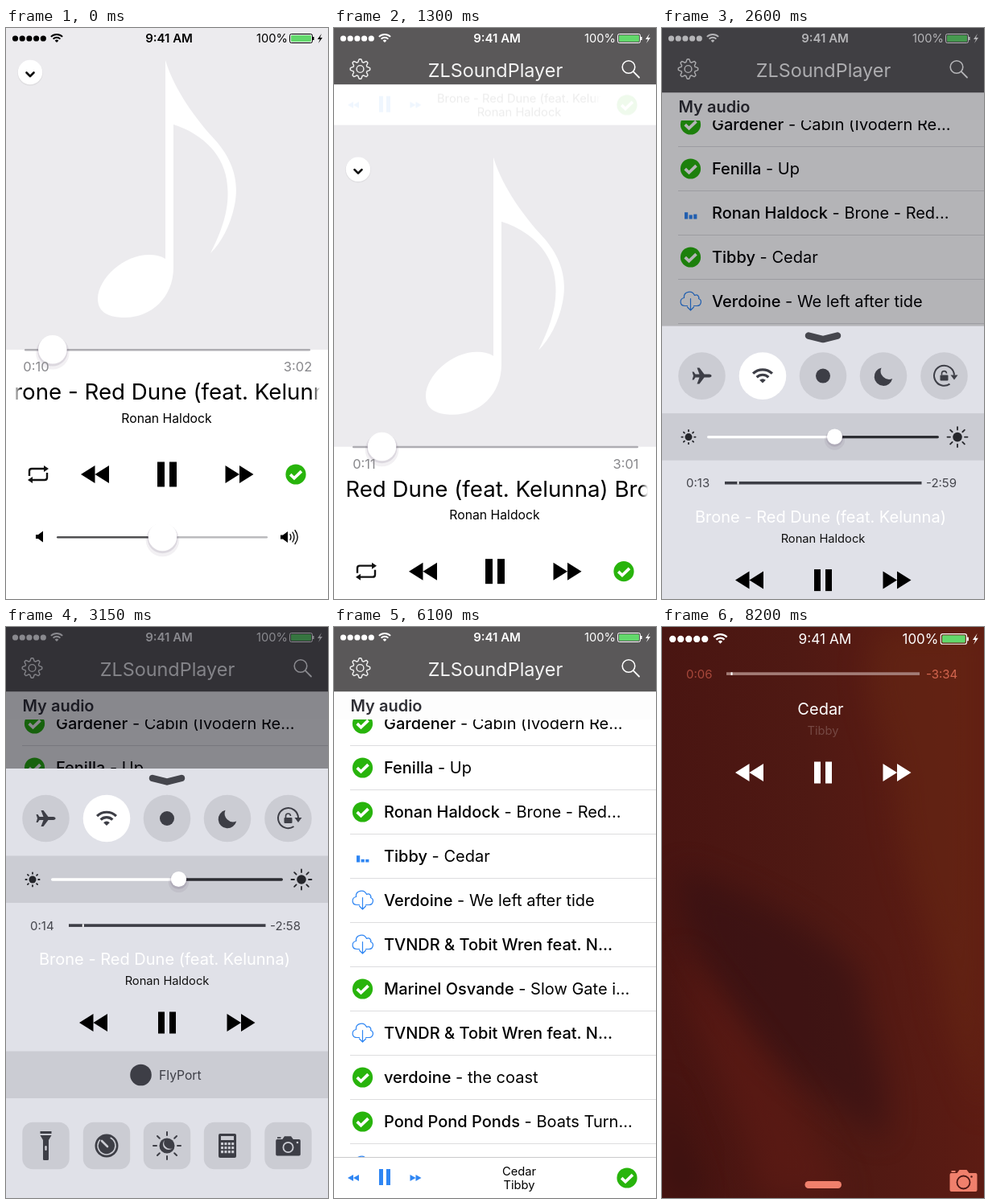
Animation, 400 px wide and 710 px high, one loop 9.2 s. Source, as an HTML page:

```html
<!DOCTYPE html>
<html lang="en">
<head>
<meta charset="utf-8">
<title>Music player</title>
<style>
html, body { margin: 0; width: 100%; height: 100%; overflow: hidden; background: #fff; }
svg { display: block; width: 100vw; height: 100vh; }
text { font-family: Inter, Roboto, sans-serif; white-space: pre; }
</style>
</head>
<body>
<svg id="stage" viewBox="0 0 400 710"></svg>
<script>
const LOOP = 9200, LAST = 8200, SWITCH = 3500;
const BLUE = '#2f86f3', INK = '#3d3e46', SALMON = '#f0806c', CELL = '#cbccd3';
const SONGS = [
  { title: 'Brone - Red Dune (feat. Kelunna)', artist: 'Ronan Haldock', length: 192 },
  { title: 'Cedar', artist: 'Tibby', length: 220 },
];
const ROWS = [
  ['Gardener', 'Cabin (Ivodern Re...', 1],
  ['Fenilla', 'Up', 1],
  ['Ronan Haldock', 'Brone - Red...', 1],
  ['Tibby', 'Cedar', 1],
  ['Verdoine', 'We left after tide', 0],
  ['TVNDR & Tobit Wren feat. N...', '', 0],
  ['Marinel Osvande', 'Slow Gate i...', 1],
  ['TVNDR & Tobit Wren feat. N...', '', 0],
  ['verdoine', 'the coast', 1],
  ['Pond Pond Ponds', 'Boats Turn...', 1],
  ['', '', 0],
];

// drawing helpers
const esc = s => s.replace(/&/g, '&amp;');
const at = (x, y, body, attrs = '') => `<g transform="translate(${x} ${y})" ${attrs}>${body}</g>`;
const text = (x, y, size, str, attrs = '') => `<text x="${x}" y="${y}" font-size="${size}" ${attrs}>${esc(str)}</text>`;
const mid = (x, y, size, str, attrs = '') => text(x, y, size, str, 'text-anchor="middle" ' + attrs);
const rect = (x, y, w, h, fill, attrs = '') => `<rect x="${x}" y="${y}" width="${w}" height="${h}" fill="${fill}" ${attrs}/>`;
const circle = (x, y, r, fill, attrs = '') => `<circle cx="${x}" cy="${y}" r="${r}" fill="${fill}" ${attrs}/>`;
const fillPath = (d, fill, attrs = '') => `<path d="${d}" fill="${fill}" ${attrs}/>`;
const line = (d, stroke, width, attrs = '') => `<path d="${d}" fill="none" stroke="${stroke}" stroke-width="${width}" ${attrs}/>`;
const ROUND = 'stroke-linecap="round" stroke-linejoin="round"';

function rays(n, inner, outer) {
  let d = '';
  for (let i = 0; i < n; i++) {
    const a = i * 2 * Math.PI / n, c = Math.cos(a), s = Math.sin(a);
    d += `M${(c * inner).toFixed(2)} ${(s * inner).toFixed(2)}L${(c * outer).toFixed(2)} ${(s * outer).toFixed(2)}`;
  }
  return d;
}
const sun = (x, y, r, inner, outer, w) => at(x, y, circle(0, 0, r, '#25262b') + line(rays(8, inner, outer), '#25262b', w, ROUND));

const skip = (x, y, w, h, dir, fill) =>
  at(x, y, fillPath([0, 1].map(k => `M${dir * w * k / 2} 0L${dir * w * (k - 1) / 2} ${-h / 2}V${h / 2}Z`).join(''), fill));
const pause = (x, y, w, h, bar, fill) =>
  rect(x - w / 2, y - h / 2, bar, h, fill) + rect(x + w / 2 - bar, y - h / 2, bar, h, fill);
const check = (x, y) => at(x, y, circle(0, 0, 12.6, '#28b40c') + line('M-6.8 .2L-2 4.8L7-3.8', '#fff', 3.7));
const cloud = (x, y) => at(x, y,
  line('M-4 6H-7C-14 6-14-3-8-4C-9-12 2-14 5-7C9-9 11-5 10-3C15-1 13 6 8 6H4M0-3V11M-4 7.5L0 11.5L4 7.5', BLUE, 1.2, ROUND));
function wifi(x, y, scale, fill) {
  const arc = r => `M${-r * .7} ${9 - r * .7}A${r} ${r} 0 0 1 ${r * .7} ${9 - r * .7}`;
  return at(x, y, `<g transform="scale(${scale})">` + line(arc(17) + arc(10.5), fill, 3.2) + fillPath(arc(5.5) + 'L0 9Z', fill) + '</g>');
}
const knob = (r, id = '') => `<g ${id && `id="${id}"`}>` + circle(0, 4, r + 3, '#203', 'opacity=".06"') +
  circle(0, 2, r + 1, '#203', 'opacity=".1"') + circle(0, 0, r, '#fff') + '</g>';
const camera = fill => fillPath('M-5-13H4L7-9H15Q17-9 17-7V12Q17 14 15 14H-15Q-17 14-17 12V-7Q-17-9-15-9H-8ZM-15-12H-10V-10H-15Z', fill);

function status(fill, scale = 1, weight = 600) {
  let dots = '';
  for (let i = 0; i < 5; i++) dots += circle(11.5 + i * 8.7, 13, 3.6, fill);
  const zoom = (x, body) => `<g transform="translate(${x} 0) scale(${scale})">${body}</g>`;
  return zoom(0, dots + wifi(63, 12.6, .6, fill)) +
    zoom(202.5, mid(0, 18, 15, '9:41 AM', `fill="${fill}" font-weight="${weight}"`)) +
    zoom(394, text(-83, 18, 14.7, '100%', `fill="${fill}"`) +
      rect(-41.5, 7.5, 28, 11, 'none', `rx="2" stroke="${fill}"`) + rect(-40, 9, 25, 8, '#62d86b', 'rx="1"') +
      rect(-13, 11, 1.6, 4, fill) + fillPath('M-2 7L-7 14H-4L-6 19L-1 12H-4Z', fill));
}

// screens
function listScreen() {
  const rows = ROWS.map(([name, song, saved], i) => {
    const y = 119.5 + i * 55;
    return `<g id="icon${i}">` + (saved ? check(35.5, y + .5) : cloud(35.5, y)) + '</g>' +
      `<text x="62" y="${y + 7}" font-size="20"><tspan font-weight="500">${esc(name)}</tspan>${song && ' - ' + song}</text>` +
      rect(20, y + 27.5, 380, 1, '#dddddf');
  }).join('');
  const bars = [0, 1, 2].map(i => `<rect id="bar${i}" x="${28 + i * 5.6}" width="4.2" fill="${BLUE}"/>`).join('');
  const gear = line(Array.from({ length: 65 }, (_, i) => {
    const a = i * Math.PI / 32, r = 10.6 + 1.7 * Math.tanh(3 * Math.cos(8 * a));
    return (i ? 'L' : 'M') + (r * Math.cos(a)).toFixed(2) + ' ' + (r * Math.sin(a)).toFixed(2);
  }).join('') + 'Z', '#f2f2f2', 1.4, ROUND) + circle(0, 0, 4.4, 'none', 'stroke="#f2f2f2" stroke-width="1.4"');
  return rect(0, 0, 400, 710, '#fff') + rows + `<g id="bars">${bars}</g>` +
    rect(0, 80, 400, 35, '#fdfdfd') + text(20.5, 105, 20, 'My audio', 'font-weight="600" fill="#303036"') +
    rect(0, 0, 400, 80, '#5a5859') + rect(0, 80, 400, .6, '#b2b2b2') +
    mid(200.5, 61, 23.4, 'ZLSoundPlayer', 'fill="#f4f4f4"') + at(32.5, 51, gear) +
    at(366, 48.5, circle(0, 0, 7.8, 'none', 'stroke="#fff" stroke-width="1.6"') + line('M5.7 5.7L13 13', '#fff', 1.8, ROUND));
}

function playerScreen() {
  const note = 'M198 40C207 71 230 106 255 134C282 162 290 190 284 220C279 245 268 266 254 280C268 252 278 225 275 196' +
    'C272 155 240 130 208 120V298C208 335 180 360 148 360C122 360 114 350 114 336C115 312 145 282 178 282Q190 282 198 287Z';
  const speaker = 'M-5-2.5H-2L4-7V7L-2 2.5H-5Z';
  const mini = rect(0, -50.5, 400, 51, '#fff') + '<g id="mini">' + rect(0, -51, 400, 1, '#c9c9cb') +
    skip(24, -25, 14, 8, -1, BLUE) + pause(63, -26, 14, 20, 5, BLUE) + skip(101.5, -25, 14, 8, 1, BLUE) +
    '<g clip-path="url(#miniClip)"><text id="miniTitle" y="-28" font-size="14.7"/></g>' +
    rect(320, -48, 12, 26, 'url(#fadeR)') +
    '<text id="miniArtist" x="230" y="-11" font-size="14.7" text-anchor="middle"/>' + check(364, -25) + '</g>';
  const song = SONGS[0].title;
  return mini + rect(0, 0, 400, 710, '#fff') + rect(0, 0, 400, 400, '#ecebee') + fillPath(note, '#fff') +
    circle(30, 56, 15.8, '#000', 'opacity=".05"') + circle(30, 55, 15.2, '#fff') + line('M25.5 55.5L30 60L34.5 55.5', '#111', 2.7, ROUND) +
    rect(23, 399, 355, 2.6, '#aeadb2', 'rx="1.3"') + knob(17.8, 'seek') +
    '<text id="elapsed" x="37.5" y="427" font-size="16.5" text-anchor="middle" fill="#88888c"/>' +
    '<text id="remaining" x="362.5" y="427" font-size="16.5" text-anchor="middle" fill="#88888c"/>' +
    '<g clip-path="url(#marqueeClip)">' + text(0, 462, 27.7, song + ' ' + song, 'id="marquee"') + '</g>' +
    rect(10, 432, 9, 42, 'url(#fadeL)') + rect(381, 432, 9, 42, 'url(#fadeR)') +
    mid(199.5, 490.5, 15.75, SONGS[0].artist) +
    at(40, 555, line('M-11 2V-4Q-11-7-8-7H9M11-2V4Q11 7 8 7H-9', '#111', 2.4) +
      fillPath('M7-11L13-7L7-3ZM-7 11L-13 7L-7 3Z', '#111')) +
    skip(110.5, 555, 35, 22, -1, '#000') + pause(200, 555, 24, 31, 9, '#000') + skip(290, 555, 35, 22, 1, '#000') + check(360, 555) +
    at(42, 632.5, fillPath(speaker, '#000')) +
    rect(63, 632, 132, 2.4, '#505052', 'rx="1.2"') + rect(194, 632, 131, 2.4, '#bbbbbe', 'rx="1.2"') + at(194.5, 632.5, knob(17.8)) +
    at(346, 633, fillPath(speaker, '#000') + line('M7-3.5Q9 0 7 3.5M10-6Q14 0 10 6M13-8.5Q19.5 0 13 8.5', '#000', 1.3, ROUND));
}

// playback block shared by the control panel and the lock screen, origin at the progress line
const playback = (key, x, width, gap, colors) =>
  `<text id="${key}Elapsed" x="30" y="5.5" font-size="15" fill="${colors.left}"/>` +
  `<text id="${key}Remaining" x="328" y="5.5" font-size="15" fill="${colors.right}"/>` +
  rect(x, -1.7, width, 3.6, colors.track) + `<rect id="${key}Tick" y="-1.7" width="2" height="3.6" fill="#fff"/>` +
  `<text id="${key}Title" x="197" y="${gap - 72}" font-size="20" text-anchor="middle" fill="#fff"/>` +
  `<text id="${key}Artist" x="200" y="${gap - 47}" font-size="14.7" text-anchor="middle" fill="${colors.artist}"/>` +
  skip(108.5, gap, 35, 22, -1, colors.button) + pause(200, gap, 22, 27, 8, colors.button) + skip(292, gap, 35, 22, 1, colors.button);

function panelScreen() {
  const xs = [49.5, 125, 200, 275, 350.5];
  const top = [
    fillPath('M12 0C12-2 9-2 7-2H3L-3-10H-6L-3-2H-8L-10-5H-12L-10.5 0L-12 5H-10L-8 2H-3L-6 10H-3L3 2H7C9 2 12 2 12 0Z', INK),
    wifi(0, 0, 1, INK),
    circle(0, 0, 9, INK),
    fillPath('M-2.5-10.2A11.4 11.4 0 1 0 11.2 3.5A10.5 10.5 0 0 1-2.5-10.2Z', INK),
    line('M7 10A12.5 12.5 0 1 1 12.5-1', INK, 2) + fillPath('M8-1H17L12.5 5Z', INK) +
      rect(-5, -1, 10, 7, INK, 'rx="1"') + line('M-3-1V-3Q-3-6 0-6Q3-6 3-3', INK, 1.6),
  ];
  let keys = '';
  for (let i = 0; i < 12; i++) keys += rect(-8 + i % 4 * 4.4, -4 + (i >> 2) * 5, 3, 3.2, CELL);
  const bottom = [
    fillPath('M-7-18H7V-15H-7ZM-7-13H7L3.5-7V17Q3.5 18 2 18H-2Q-3.5 18-3.5 17V-7Z', INK) + rect(-1.2, 0, 2.4, 6, CELL, 'rx="1.2"'),
    circle(0, 0, 14.5, INK) + circle(0, 0, 11, 'none', `stroke="${CELL}" stroke-width="1.6" stroke-dasharray="55 14" transform="rotate(-65)"`) +
      line('M-6-6L1 1', CELL, 2.6, ROUND),
    circle(0, 0, 9.5, INK) + fillPath('M-3-7A7.5 7.5 0 0 0 7 3A6 6 0 0 1-3-7Z', CELL) + line(rays(8, 13, 17), INK, 2, ROUND),
    rect(-11, -15, 22, 30, INK, 'rx="2"') + rect(-8, -12, 16, 5, CELL) + keys,
    `<g transform="scale(.9)">${camera(INK)}</g>` + circle(0, 2, 7, CELL) + circle(0, 2, 5.2, INK) + circle(11.5, -4, 1.3, CELL),
  ];
  return rect(0, 0, 400, 540, '#e0e1e8') + line('M182 12L200 16.5L218 12', '#45464d', 8.5, ROUND) +
    xs.map((x, i) => at(x, 62, circle(0, 0, 29.3, i === 1 ? '#fff' : CELL) + top[i])).join('') +
    rect(0, 108.5, 400, 58.5, CELL) + sun(33, 138, 4.5, 7.2, 8.6, 1.8) + sun(367, 138, 5.8, 9, 12.5, 1.8) +
    rect(56, 136.3, 158, 3.4, '#fff', 'rx="1.7"') + rect(214, 136.3, 130, 3.4, '#2c2d32', 'rx="1.7"') + at(214.5, 137.5, knob(9.6)) +
    at(0, 195, playback('panel', 78, 244.5, 121, { left: '#45464d', right: '#45464d', track: INK, artist: '#111', button: '#000' })) +
    rect(0, 351.5, 400, 58.5, CELL) + circle(167.5, 381, 13.3, INK) + text(190, 387, 15.7, 'FlyPort', `fill="${INK}"`) +
    xs.map((x, i) => at(x, 469, rect(-29.2, -29.2, 58.4, 58.4, CELL, 'rx="13"') + bottom[i])).join('');
}

function lockScreen() {
  return rect(0, 0, 400, 710, 'url(#wall)') +
    fillPath('M400 0H270C230 90 290 130 290 220C300 330 345 380 350 480L400 610Z', '#672913', 'opacity=".5" filter="url(#soft)"') +
    fillPath('M20 300C110 330 190 370 245 430C250 500 290 560 275 640C220 590 150 560 110 500C70 440 20 390 20 300Z', '#321014', 'opacity=".55" filter="url(#soft)"') +
    fillPath('M20 400C80 470 180 590 230 710H120C110 620 40 520 20 400Z', '#641c15', 'opacity=".5" filter="url(#soft)"') +
    fillPath('M0 560L60 710H0Z', '#32100f', 'opacity=".5" filter="url(#soft)"') +
    status('#fff', 1.15, 400) +
    at(0, 58, playback('lock', 80, 240, 123, { left: '#a8483b', right: '#d4664f', track: '#a37d77', artist: '#754843', button: '#fff' })) +
    rect(177.5, 689, 45.5, 9, SALMON, 'rx="4.5"') +
    at(374.5, 688, camera(SALMON) + circle(0, 2.5, 8, 'none', 'stroke="#4a1613" stroke-width="1.8"') + circle(10, -4.5, 1.2, '#4a1613'));
}

const fade = (id, a, b) => `<linearGradient id="${id}"><stop stop-color="#fff" stop-opacity="${a}"/><stop offset="1" stop-color="#fff" stop-opacity="${b}"/></linearGradient>`;
document.getElementById('stage').innerHTML = '<defs>' + fade('fadeL', 1, 0) + fade('fadeR', 0, 1) +
  `<linearGradient id="wall" x1="0" y1=".6" x2="1" y2=".4"><stop stop-color="#481411"/><stop offset=".5" stop-color="#4f1913"/><stop offset="1" stop-color="#601c13"/></linearGradient>
  <filter id="soft" x="-30%" y="-30%" width="160%" height="160%" color-interpolation-filters="sRGB"><feGaussianBlur stdDeviation="18"/></filter>
  <clipPath id="miniClip"><rect x="127" y="-50" width="205" height="50"/></clipPath>
  <clipPath id="marqueeClip"><rect x="10" y="425" width="380" height="55"/></clipPath></defs>` +
  `<g>${listScreen()}</g><g id="player">${playerScreen()}</g>` +
  `<g id="darkStatus">${status('#000')}</g><g id="lightStatus">${status('#fff')}</g>` +
  `<rect id="dim" width="400" height="710" fill="#06060f"/><g id="panel">${panelScreen()}</g>` +
  `<rect id="black" width="400" height="710"/><g id="lock">${lockScreen()}</g>`;

const el = {};
document.querySelectorAll('#stage [id]').forEach(node => el[node.id] = node);
const set = (id, name, value) => el[id].setAttribute(name, value);
const say = (id, str) => { if (el[id].textContent !== str) el[id].textContent = str; };
const show = (id, on) => set(id, 'visibility', on ? 'visible' : 'hidden');
const move = (id, x, y) => set(id, 'transform', `translate(${x} ${y})`);
const ramp = (t, from, to) => Math.min(1, Math.max(0, (t - from) / (to - from)));
const smooth = p => p * p * (3 - 2 * p);
const easeOut = p => 1 - (1 - p) ** 3;
const clock = s => Math.floor(s / 60) + ':' + String(s % 60).padStart(2, '0');

function render(time) {
  const t = Math.min(time, LAST), second = t >= SWITCH;
  const song = SONGS[+second];
  const played = second ? (t - SWITCH) * .0013 : 10.1 + t * .0013;
  const elapsed = Math.floor(played), left = clock(song.length - elapsed), part = elapsed / song.length;

  const drop = smooth(ramp(t, 1087, 1900));
  move('player', 0, 710 * drop);
  set('mini', 'opacity', Math.max(0, (drop - .1) / .9));
  show('darkStatus', drop < .01);
  show('lightStatus', drop >= .01);
  move('seek', 41.2 + 320 * part, 399.8);
  set('marquee', 'x', -8 - .064 * t);
  say('elapsed', clock(elapsed));
  say('remaining', left);
  say('miniTitle', song.title);
  say('miniArtist', song.artist);
  set('miniTitle', 'x', second ? 230 : 128);
  set('miniTitle', 'text-anchor', second ? 'middle' : 'start');

  show('icon2', second);
  show('icon3', !second);
  const beat = (t - 2250) * Math.PI;
  [6 - 2.3 * Math.cos(beat / 350), 6 + 2.3 * Math.cos(beat / 550), 4.8 - 1.2 * Math.cos(beat / 385)].forEach((h, i) => {
    set('bar' + i, 'height', h);
    set('bar' + i, 'y', (second ? 292.5 : 237.5) - h);
  });

  const open = easeOut(ramp(t, 2480, 2900)) * (1 - smooth(ramp(t, 5680, 6030)));
  set('dim', 'opacity', .47 * open);
  move('panel', 0, 710 - 534 * open);
  for (const [key, x, width] of [['panel', 78, 244], ['lock', 80, 240]]) {
    say(key + 'Elapsed', clock(elapsed));
    say(key + 'Remaining', '-' + left);
    say(key + 'Title', song.title);
    say(key + 'Artist', song.artist);
    set(key + 'Tick', 'x', x - 1 + width * part);
  }

  set('black', 'opacity', smooth(ramp(t, 7200, 7540)));
  set('lock', 'opacity', smooth(ramp(t, 7680, 8180)));
}

let start = null;
function tick(now) {
  if (start === null) start = now;
  render((now - start) % LOOP);
  requestAnimationFrame(tick);
}
render(0);
requestAnimationFrame(tick);
</script>
</body>
</html>
```
